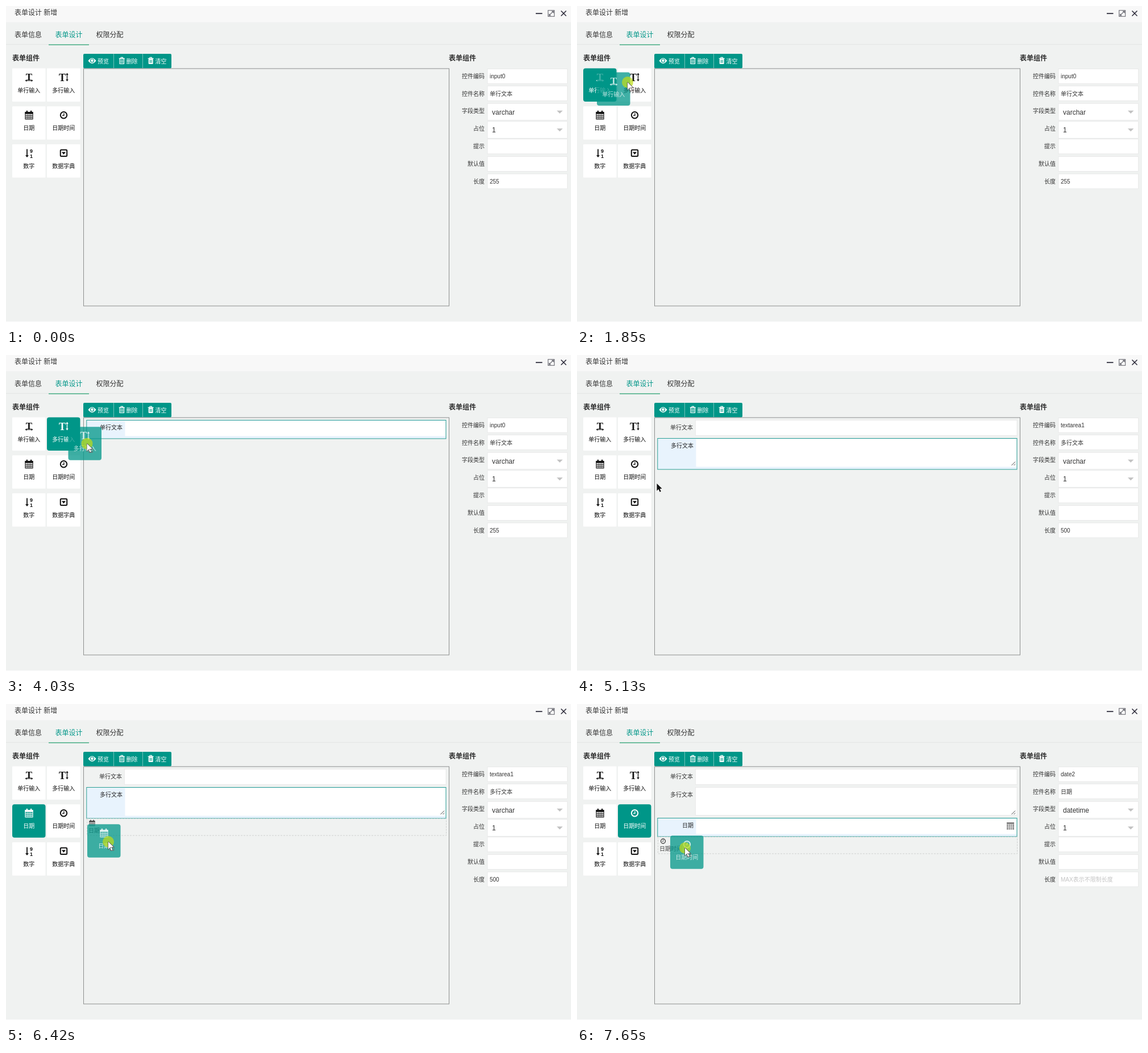
These frames come from a looping animation (994x564 px, 8 s). An HTML page with a canvas:

```html
<!DOCTYPE html>
<html lang="zh">
<head>
<meta charset="utf-8">
<title>表单设计</title>
<style>
html, body { margin: 0; width: 100%; height: 100%; overflow: hidden; background: #fff; }
canvas { display: block; }
</style>
</head>
<body>
<canvas id="stage" width="994" height="564"></canvas>
<script>
const ctx = document.getElementById('stage').getContext('2d');
const LOOP = 8000;
const GREEN = '#009688';
const SANS = '"Liberation Sans", "Noto Sans CJK SC", "Noto Sans CJK", sans-serif';
const SERIF = '"Liberation Serif", serif';

// Screen updates come in bursts: [start, end, steps]
const BURSTS = [
  [260, 1030, 12], [1100, 1850, 10], [1940, 2340, 7], [2670, 3430, 12], [3500, 3500, 1],
  [3890, 4640, 10], [4720, 4860, 3], [5060, 5680, 10], [5880, 6620, 11], [6690, 7450, 11], [7510, 7650, 3]
];

// Pointer path: [time, x, y]
const PATH = [
  [260, 866, 532], [1030, 239, 295], [1100, 205, 262], [1450, 72, 135], [1700, 65, 127],
  [1780, 65, 127], [1850, 89, 134], [1940, 110, 137], [2340, 182, 143], [2670, 182, 143],
  [3010, 179, 139], [3430, 101, 137], [3500, 104, 137], [3890, 105, 139], [4030, 168, 167],
  [4390, 177, 190], [4640, 177, 190], [4860, 164, 230], [5060, 152, 228], [5680, 48, 207],
  [5880, 48, 207], [5950, 60, 210], [6270, 180, 242], [6620, 180, 242], [6690, 165, 233],
  [6970, 98, 200], [7240, 98, 198], [7450, 176, 243], [7650, 190, 253]
];

const SLIDE = 150;
const DRAGS = [
  { item: 0, press: 1780, enter: 2010, drop: 2670, rowY: 114 },
  { item: 1, press: 3890, enter: 4010, drop: 4390, rowY: 147 },
  { item: 2, press: 5880, enter: 6160, drop: 6480, rowY: 201 },
  { item: 3, press: 7240, enter: 7380, drop: Infinity, rowY: 233 }
];

const ROWS = [
  { label: '单行文本', y: 114, h: 27 },
  { label: '多行文本', y: 146, h: 49, grip: true },
  { label: '日期', y: 200, h: 27, calendar: true }
];

const PROPS = [
  { code: 'input0', name: '单行文本', type: 'varchar', size: '255' },
  { code: 'textarea1', name: '多行文本', type: 'varchar', size: '500' },
  { code: 'date2', name: '日期', type: 'datetime', size: '' }
];

const ITEMS = ['单行输入', '多行输入', '日期', '日期时间', '数字', '数据字典']
  .map((label, i) => ({ label, x: 11 + 61 * (i % 2), y: 109.5 + 66.7 * Math.floor(i / 2) }));

function rect(x, y, w, h, color, radius = 0) {
  ctx.fillStyle = color;
  ctx.beginPath();
  ctx.roundRect(x, y, w, h, radius);
  ctx.fill();
}

function frame(x, y, w, h, color, width = 1) {
  ctx.strokeStyle = color;
  ctx.lineWidth = width;
  ctx.strokeRect(x, y, w, h);
}

function line(points, color, width = 1) {
  ctx.strokeStyle = color;
  ctx.lineWidth = width;
  ctx.beginPath();
  for (let i = 0; i < points.length; i += 2) ctx.lineTo(points[i], points[i + 1]);
  ctx.stroke();
}

function poly(points, color) {
  ctx.fillStyle = color;
  ctx.beginPath();
  for (let i = 0; i < points.length; i += 2) ctx.lineTo(points[i], points[i + 1]);
  ctx.closePath();
  ctx.fill();
}

function ring(x, y, r, color, width) {
  ctx.strokeStyle = color;
  ctx.lineWidth = width;
  ctx.beginPath();
  ctx.arc(x, y, r, 0, 7);
  ctx.stroke();
}

function disc(x, y, r, color) {
  ctx.fillStyle = color;
  ctx.beginPath();
  ctx.arc(x, y, r, 0, 7);
  ctx.fill();
}

// y is the optical centre of the line
function text(str, x, y, { size = 10, color = '#333', align = 'left', weight = 400, family = SANS } = {}) {
  ctx.font = `${weight} ${size}px ${family}`;
  ctx.fillStyle = color;
  ctx.textAlign = align;
  ctx.fillText(str, x, y + size * 0.37);
}

function at(x, y, draw, scale = 1) {
  ctx.save();
  ctx.translate(x, y);
  ctx.scale(scale, scale);
  draw();
  ctx.restore();
}

const serifT = (x, y, size, color) =>
  text('T', x, y, { size, color, align: 'center', weight: 700, family: SERIF });

const ICONS = [
  c => {
    serifT(0, -1.5, 17, c);
    line([-5, 6, 5, 6], c, 1.2);
    poly([-7, 6, -4, 4, -4, 8], c);
    poly([7, 6, 4, 4, 4, 8], c);
  },
  c => {
    serifT(-2.5, 0, 18, c);
    line([6, -5, 6, 5], c, 1.3);
    poly([6, -7.5, 3.8, -4, 8.2, -4], c);
    poly([6, 7.5, 3.8, 4, 8.2, 4], c);
  },
  c => {
    frame(-6.5, -5, 13, 12, c, 1.2);
    rect(-7, -5.5, 14, 3.5, c);
    rect(-4.8, -8, 2.4, 4, c, 1);
    rect(2.4, -8, 2.4, 4, c, 1);
    for (const d of [-3.2, 0, 3.2]) line([d, -2, d, 7], c, 0.9);
    for (const d of [1, 4]) line([-6.5, d, 6.5, d], c, 0.9);
  },
  c => {
    ring(0, 0, 5.7, c, 2);
    line([0.4, -3.5, 0.4, 0.6, -2.6, 0.6], c, 1.3);
  },
  c => {
    line([-3.5, -7, -3.5, 5], c, 1.8);
    poly([-3.5, 7.5, -6.5, 3.8, -0.5, 3.8], c);
    text('9', 4, -3.6, { size: 9, color: c, align: 'center', weight: 700 });
    text('1', 4, 4.8, { size: 9, color: c, align: 'center', weight: 700 });
  },
  c => {
    ctx.strokeStyle = c;
    ctx.lineWidth = 2;
    ctx.beginPath();
    ctx.roundRect(-5.7, -5.7, 11.4, 11.4, 1.5);
    ctx.stroke();
    poly([-3.6, -2, 3.6, -2, 0, 2.6], c);
  }
];

function drawItem(index, x, y, active) {
  const color = active ? '#fff' : '#111';
  rect(x, y, 58.5, 58.5, active ? GREEN : '#fff', active ? 4 : 1);
  at(x + 29.5, y + 15.5, () => ICONS[index](color));
  text(ITEMS[index].label, x + 29.3, y + 38.5, { color, align: 'center' });
}

function drawTrash(x, y, solid) {
  at(x, y, () => {
    line([-5, -3.7, 5, -3.7], '#fff', 1.3);
    line([-2, -4, -1.6, -5.6, 1.6, -5.6, 2, -4], '#fff', 1.1);
    if (solid) rect(-4, -3, 8, 9, '#fff', 1);
    else frame(-3.7, -3.3, 7.4, 8.8, '#fff', 1.2);
    for (const d of [-1.7, 0, 1.7]) line([d, -1.5, d, 4], solid ? GREEN : '#fff', 0.8);
  });
}

function drawEye(x, y) {
  ctx.fillStyle = '#fff';
  ctx.beginPath();
  ctx.moveTo(x - 7, y);
  ctx.quadraticCurveTo(x, y - 9.5, x + 7, y);
  ctx.quadraticCurveTo(x, y + 9.5, x - 7, y);
  ctx.fill();
  ring(x, y - 0.3, 3, GREEN, 1.1);
}

function drawWindow() {
  rect(0, 0, 994, 564, '#fff');
  rect(0, 0, 994, 554.5, '#f0f2f1');
  rect(0, 0, 994, 28.5, '#f8f8f8');
  text('表单设计 新增', 15, 11.5, { size: 12 });
  rect(932, 12.3, 11.5, 1.8, '#2d2c3b');
  frame(953.7, 7.7, 11, 10.6, '#6b6b73', 1.1);
  line([956, 16, 962.5, 9.5], '#6b6b73', 1.1);
  poly([964, 8.5, 959.5, 8.8, 963.7, 13], '#6b6b73');
  poly([954.8, 17.4, 959, 17.2, 955, 13.2], '#6b6b73');
  line([976.5, 8.5, 985.5, 17.5], '#2d2c3b', 1.6);
  line([985.5, 8.5, 976.5, 17.5], '#2d2c3b', 1.6);

  ['表单信息', '表单设计', '权限分配'].forEach((tab, i) =>
    text(tab, [15, 86.5, 158.5][i], 50.5, { size: 12, color: i === 1 ? GREEN : '#333' }));
  rect(0, 67, 994, 1, '#e3e5e4');
  rect(75, 67.3, 71, 1.6, '#5fb894');

  const heading = { size: 12, weight: 700, color: '#2b2b2b' };
  text('表单组件', 11, 92, heading);
  text('表单组件', 779, 92, heading);

  rect(136, 84, 155, 25.5, GREEN, 2);
  rect(189, 84, 1, 25.5, '#73c2ba');
  rect(240, 84, 1, 25.5, '#73c2ba');
  drawEye(151.5, 96.3);
  drawTrash(203.8, 96, false);
  drawTrash(254.7, 96, true);
  ['预览', '删除', '清空'].forEach((label, i) =>
    text(label, [161, 211.5, 262.5][i], 97, { color: '#fff' }));
  frame(136.5, 110, 643, 417, '#8c8e8d');
}

function drawField(y, h, label, labelY) {
  text(label, 842, labelY, { align: 'right' });
  rect(847, y, 140.5, h, '#fff');
  frame(847, y, 140.5, h, '#e6e6e6', 0.8);
}

function drawProps({ code, name, type, size }) {
  const fields = [
    ['控件编码', code], ['控件名称', name], ['字段类型', type], ['占位', '1'],
    ['提示', ''], ['默认值', ''], ['长度', size]
  ];
  const tops = [110.5, 140.5, 171.3, 202.8, 233.8, 264.5, 295];
  fields.forEach(([label, value], i) => {
    const select = i === 2 || i === 3;
    const mid = 123 + 30.85 * i;
    drawField(tops[i], select ? 29.5 : 26, label, mid);
    if (select) {
      text(value, 855, tops[i] + 15, { size: 12 });
      poly([969, tops[i] + 12.5, 979.5, tops[i] + 12.5, 974.2, tops[i] + 17.7], '#c2c2c2');
    } else {
      text(value, 851, mid + 0.3);
    }
  });
  if (!size) text('MAX表示不限制长度', 851, 308, { color: '#c4c4c4' });
}

function drawRow({ label, y, h, grip, calendar }, selected) {
  const color = selected ? '#222' : '#333';
  if (selected) {
    rect(142, y + 0.5, 632, h + 5.5, '#e8f3fd');
    rect(209.5, y + 2, 564, h - 0.5, '#fff');
    frame(141.8, y + 0.5, 632.2, h + 5.5, '#2a9f94');
  } else {
    rect(208.5, y + 0.5, 565.5, h, '#fff');
    frame(208.5, y + 0.5, 565.5, h, '#e6e6e6', 0.8);
  }
  text(label, selected ? 205 : 204, y + (selected ? 13.5 : 13), { color, align: 'right' });
  if (grip) {
    line([764.5, y + 48, 771, y + 41.5], '#444');
    line([768.5, y + 48, 771, y + 45.5], '#444');
  }
  if (calendar) {
    rect(756, y + 8, 13, 12.5, '#777');
    for (let i = 0; i < 3; i++) rect(756, y + 10.8 + 3.2 * i, 13, 0.9, '#fff');
    for (let i = 0; i < 3; i++) rect(758.7 + 3.2 * i, y + 11, 0.9, 10, '#fff');
  }
}

function drawGhost({ item, enter, rowY }, t) {
  const from = ITEMS[item];
  const k = Math.min(1, (t - enter) / SLIDE);
  const x = from.x + (142 - from.x) * k;
  const y = from.y + (rowY - from.y) * k;
  const color = k < 1 ? '#777' : '#444';
  ctx.setLineDash([3, 2]);
  frame(Math.round(x) + 0.5, Math.round(y) + 0.5, 632, 29.5, '#cfd1d0');
  ctx.setLineDash([]);
  at(x + 9.5, y + 8, () => ICONS[item](color), 0.7);
  text(ITEMS[item].label, x + 3, y + 21.5, { color });
}

const ARROW = [0, 0, 0, 13, 3, 10.2, 5.2, 15.2, 7.4, 14.2, 5.3, 9.4, 9.2, 9.2];

function drawArrow(x, y, dragging) {
  at(x, y, () => {
    line([...ARROW, 0, 0], dragging ? '#4a4a4a' : '#fff', 1.4);
    poly(ARROW, dragging ? '#fff' : '#111');
    if (dragging) {
      ctx.setLineDash([1.5, 1]);
      frame(3.5, 10, 6.5, 5.5, '#7b5555', 0.9);
      ctx.setLineDash([]);
    }
  });
}

function drawHand(x, y) {
  at(x, y, () => {
    ctx.beginPath();
    ctx.moveTo(-1.2, 9);
    ctx.lineTo(-1.2, 1);
    ctx.quadraticCurveTo(0.3, -1.4, 1.8, 1);
    ctx.lineTo(1.8, 5.2);
    ctx.lineTo(7, 6.3);
    ctx.quadraticCurveTo(8.6, 7, 8.2, 10);
    ctx.lineTo(6.6, 15.8);
    ctx.lineTo(0, 15.8);
    ctx.lineTo(-4.2, 9.4);
    ctx.quadraticCurveTo(-3.6, 7.2, -1.2, 9);
    ctx.closePath();
    ctx.fillStyle = '#d8343c';
    ctx.strokeStyle = '#47201f';
    ctx.lineWidth = 1.1;
    ctx.fill();
    ctx.stroke();
    for (const d of [2.2, 4.6]) line([d, 6, d, 9.5], '#47201f', 0.8);
  });
}

function quantize(t) {
  let shown = 0;
  for (const [start, end, steps] of BURSTS) {
    if (t < start) break;
    const step = (end - start) / (steps - 1) || 1;
    shown = Math.min(end, start + Math.floor((t - start) / step + 1e-6) * step);
  }
  return shown;
}

function pointer(t) {
  const next = PATH.findIndex(p => p[0] > t);
  if (next < 0) return PATH[PATH.length - 1].slice(1);
  if (next === 0) return null;
  const [t0, x0, y0] = PATH[next - 1];
  const [t1, x1, y1] = PATH[next];
  const k = (t - t0) / (t1 - t0);
  return [x0 + (x1 - x0) * k, y0 + (y1 - y0) * k];
}

function render(time) {
  const t = quantize(time);
  const pos = pointer(t);
  const drag = DRAGS.find(d => t >= d.press && t < d.drop);
  const dropped = DRAGS.filter(d => t >= d.drop).length;
  const inside = drag && t >= drag.enter;

  let active = -1;
  if (drag) {
    if (!inside || t >= drag.enter + SLIDE) active = drag.item;
  } else if (pos) {
    active = ITEMS.findIndex(({ x, y }) =>
      pos[0] >= x && pos[0] < x + 58.5 && pos[1] >= y && pos[1] < y + 58.5);
  }

  drawWindow();
  ITEMS.forEach(({ x, y }, i) => drawItem(i, x, y, i === active));
  drawProps(PROPS[Math.max(0, dropped - 1)]);
  for (let i = 0; i < dropped; i++) drawRow(ROWS[i], i === dropped - 1);
  if (!pos) return;

  const [x, y] = pos;
  if (!drag) {
    if (active >= 0) drawHand(x, y);
    else drawArrow(x, y, false);
    return;
  }

  if (inside) drawGhost(drag, t);
  const [px, py] = pointer(drag.press);
  const moved = Math.hypot(x - px, y - py) > 3;
  if (moved) {
    const home = ITEMS[drag.item];
    ctx.globalAlpha = 0.75;
    drawItem(drag.item, home.x + x - px, home.y + y - py, true);
    ctx.globalAlpha = 1;
  }
  disc(x, y, 10, 'rgba(190, 220, 25, 0.72)');
  if (moved) drawArrow(x, y, true);
  else drawHand(x, y);
}

function tick() {
  render(performance.now() % LOOP);
  requestAnimationFrame(tick);
}
tick();
</script>
</body>
</html>
```
